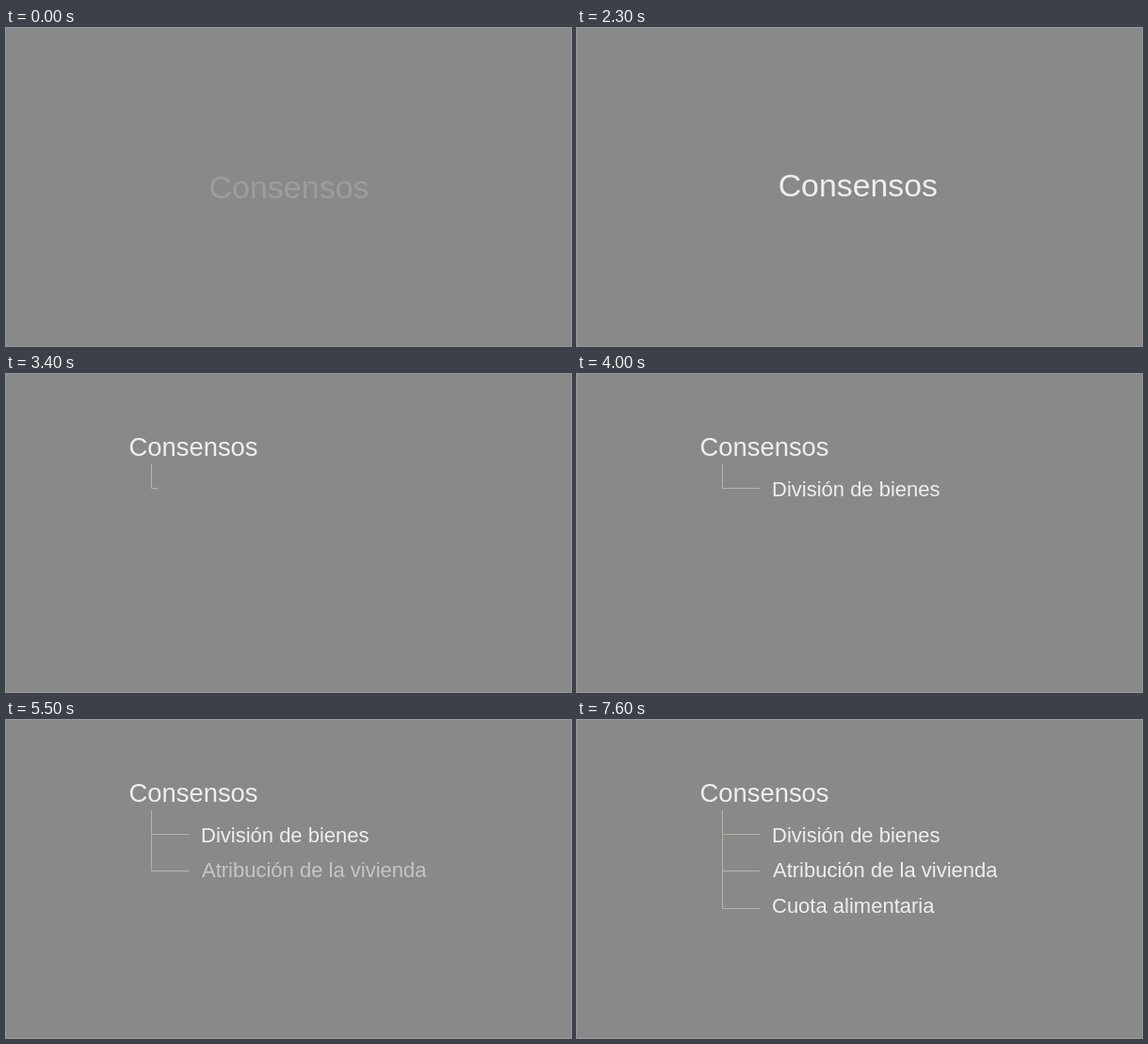
Animation of 600 by 338 pixels, one loop 8000 ms. Source, as an HTML page with a canvas:

```html
<!DOCTYPE html>
<html lang="es">
<head>
<meta charset="utf-8">
<style>
  html, body { margin: 0; height: 100%; overflow: hidden; background: #8a898a; }
  canvas { display: block; }
</style>
</head>
<body>
<canvas id="stage" width="600" height="338"></canvas>
<script>
const ctx = document.getElementById('stage').getContext('2d');
const LOOP = 8000, STEP = 100;

const items = [
  { text: 'División de bienes',       base: 129.6, y: 121.5, top: 96,    line: 3200, fade: 3600 },
  { text: 'Atribución de la vivienda', base: 167,   y: 160.5, top: 121.5, line: 4700, fade: 5300 },
  { text: 'Cuota alimentaria',        base: 204.8, y: 200.5, top: 160.5, line: 6500, fade: 7200 }
];

const clamp = v => Math.max(0, Math.min(1, v));
const mix = (a, b, k) => a + (b - a) * k;
const inOut = (u, p) => u < .5 ? (2 * u) ** p / 2 : 1 - (2 - 2 * u) ** p / 2;
// Progress that already shows its first step at the start time
const progress = (t, start, steps) => clamp((t - start + STEP) / (steps * STEP));

// Places the left edge of the ink at x
function label(text, x, base, size, alpha) {
  if (alpha <= 0) return;
  ctx.font = `${size}px "Liberation Sans", Arial, sans-serif`;
  ctx.fillStyle = `rgba(238, 238, 238, ${alpha})`;
  ctx.fillText(text, x + ctx.measureText(text).actualBoundingBoxLeft, base);
}

// Runs down from top to y, then right
function branch(top, y, k) {
  if (k <= 0) return;
  const drop = y - top, run = 39.5, len = (drop + run) * k;
  ctx.beginPath();
  ctx.moveTo(154.5, top);
  ctx.lineTo(154.5, top + Math.min(len, drop));
  if (len > drop) ctx.lineTo(154.5 + len - drop, y);
  ctx.stroke();
}

function draw(t) {
  ctx.fillStyle = '#8a898a';
  ctx.fillRect(0, 0, 600, 338);
  ctx.strokeStyle = '#b4b4ac';
  ctx.lineWidth = 1;
  for (const { text, base, y, top, line, fade } of items) {
    branch(top, y, inOut(progress(t, line, 6), 1.6));
    label(text, 208, base, 22, progress(t, fade, 5));
  }
  const k = inOut(progress(t, 2300, 7), 2.5);
  label('Consensos', mix(216.5, 131.5, k), mix(181, 86.5, k), mix(34, 27.4, k), clamp(.2 + t / 375));
}

function frame(now) {
  draw(Math.floor(now % LOOP / STEP) * STEP);
  requestAnimationFrame(frame);
}
requestAnimationFrame(frame);
</script>
</body>
</html>
```
